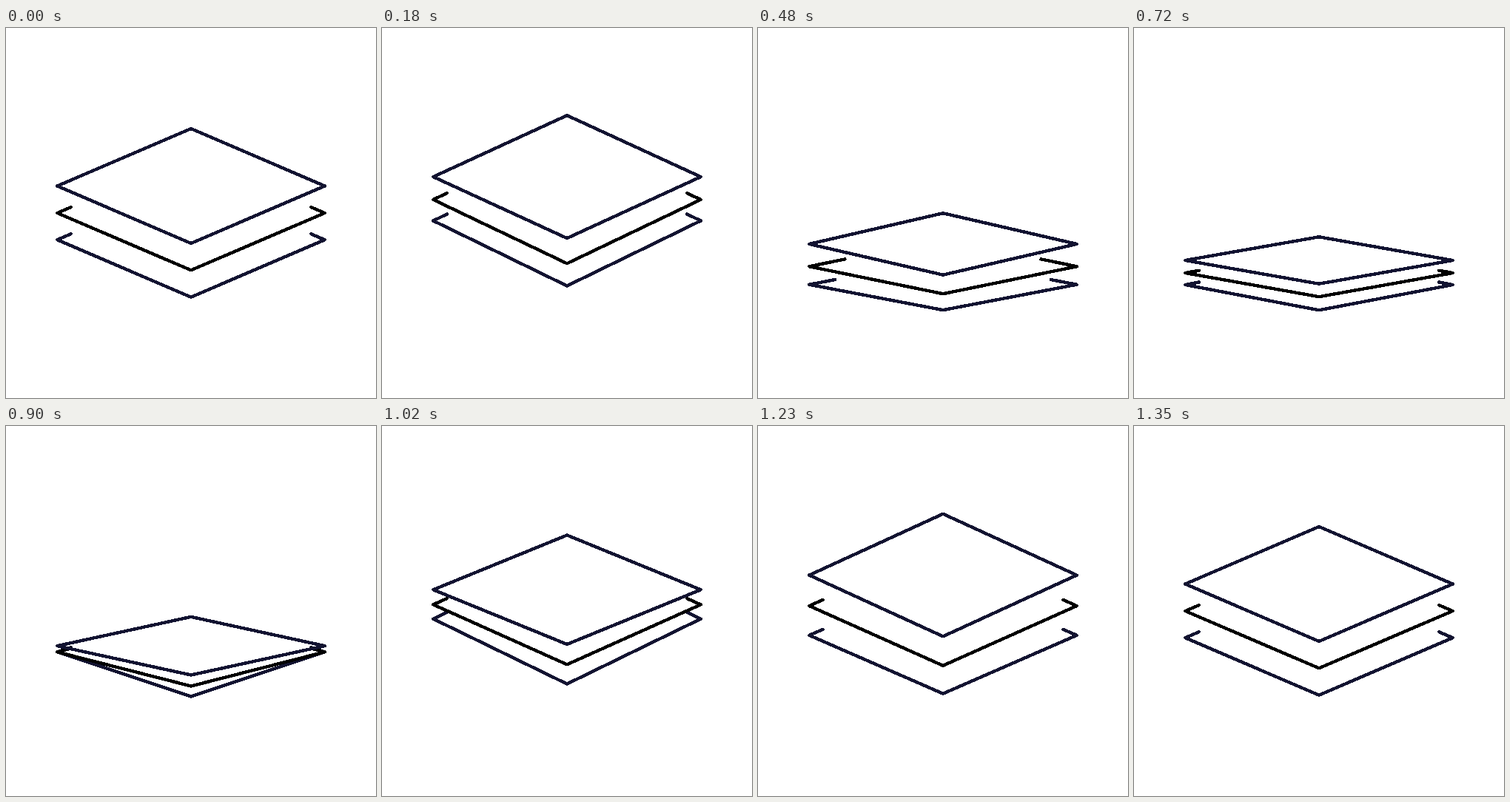
Recreate the animation shown at these times as an HTML page. Size 500 by 500 pixels, loop 4910 ms.

```html
<!DOCTYPE html>
<html lang="en">
<head>
<meta charset="utf-8">
<title>Layers</title>
<style>
html, body { margin: 0; width: 100%; height: 100%; overflow: hidden; background: #fff; }
svg { display: block; width: 100%; height: 100%; }
path {
  fill: none; stroke: #121331; stroke-width: 4.4;
  stroke-linecap: round; stroke-linejoin: round; shape-rendering: crispEdges;
}
#middle { stroke: #000; }
</style>
</head>
<body>
<svg viewBox="0 0 500 500">
  <path id="bottom"/>
  <path id="middle"/>
  <path id="top"/>
</svg>
<script>
const LOOP = 4910, STEP = 30, LAST = 45;
const CX = 250, HALF = 180.7;

// Poses: [side corner y, half height, hook length]
const poses = {
  top: { rest: [213.5, 77.5, 0], up: [189.6, 88.1, 0], down: [314, 31.7, 0] },
  middle: {
    rest: [250, 77.3, 18.4], up: [228.1, 88.2, 18.6],
    wide: [331, 32.2, 51], down: [331, 32.2, 18.6]
  },
  bottom: {
    rest: [286.2, 77.5, 18.4], up: [260.5, 88, 18.6],
    wide: [346.4, 34.6, 51], down: [347, 34.3, 18.6]
  }
};

// Keys: [step, pose]
const keys = {
  top: [[1.8, 'rest'], [10, 'up'], [18.2, 'down'], [27.9, 'down'], [37, 'up'], [45, 'rest']],
  middle: [[0.5, 'rest'], [8, 'up'], [17.75, 'wide'], [22, 'down'], [27.1, 'down'], [36, 'up'], [44, 'rest']],
  bottom: [[0, 'rest'], [6, 'up'], [14, 'wide'], [18, 'down'], [26, 'down'], [34.2, 'up'], [43, 'rest']]
};

const ease = x => x * x * (3 - 2 * x);
const clamp = x => Math.min(1, Math.max(0, x));

function poseAt(name, step) {
  const list = keys[name];
  let i = 0;
  while (i < list.length - 2 && step >= list[i + 1][0]) i++;
  const [t0, from] = list[i], [t1, to] = list[i + 1];
  const k = ease(clamp((step - t0) / (t1 - t0)));
  const b = poses[name][to];
  return poses[name][from].map((v, j) => v + (b[j] - v) * k);
}

function outline(name, step) {
  const [y, h, hook] = poseAt(name, step);
  const left = CX - HALF, right = CX + HALF;
  const lower = `L${left} ${y}L${CX} ${y + h}L${right} ${y}`;
  if (name === 'top') return `M${CX} ${y - h}${lower}Z`;
  const hookY = y - h * hook / HALF;
  return `M${left + hook} ${hookY}${lower}L${right - hook} ${hookY}`;
}

function draw(ms) {
  const step = Math.min(LAST, Math.floor(ms % LOOP / STEP));
  for (const name in keys) {
    document.getElementById(name).setAttribute('d', outline(name, step));
  }
}

const start = performance.now();
function tick() {
  draw(performance.now() - start);
  requestAnimationFrame(tick);
}
tick();
</script>
</body>
</html>
```
